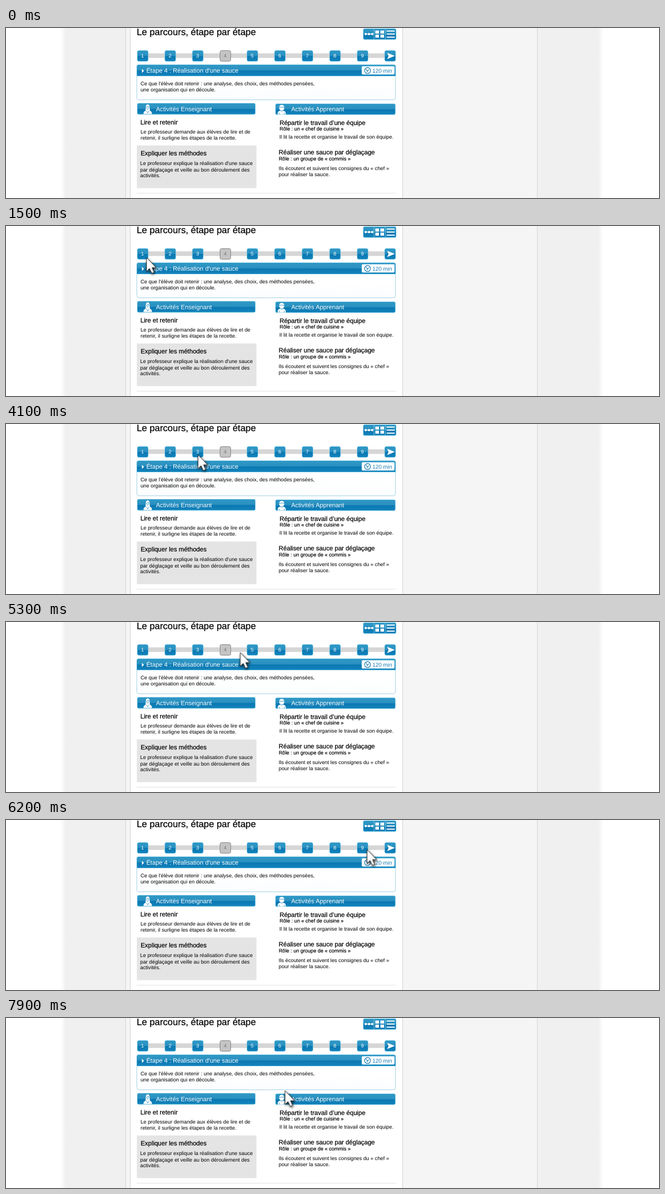
Animation, 1280 px wide and 335 px high, one loop 8000 ms. Source, as an HTML page:

```html
<!DOCTYPE html>
<html lang="fr">
<head>
<meta charset="utf-8">
<title>Le parcours, étape par étape</title>
<style>
  html, body { margin: 0; width: 100%; height: 100%; overflow: hidden; background: #fff; }
  svg { display: block; width: 1280px; height: 335px; }
  text { font-family: "Liberation Sans", Arial, sans-serif; text-rendering: geometricPrecision; fill: #000; }
  .title { font-size: 18.2px; stroke: #000; stroke-width: .25; }
  .head { font-size: 12.43px; stroke: #000; stroke-width: .25; }
  .role { font-size: 9.95px; stroke: #000; stroke-width: .2; }
  .body { font-size: 10.2px; }
  .bar { font-size: 12.15px; fill: #fff; }
  .num { font-size: 10px; fill: #fff; text-anchor: middle; }
  .time { font-size: 10.8px; fill: #1a7db3; }
  .blue { fill: url(#blue); stroke: #57b7dc; }
  .edge { fill: #cfcfcf; }

  /* 10 steps per second: each leg is cut into its number of 100 ms steps */
  #cursor {
    animation: travel 8s -10ms infinite, appear 8s -10ms infinite;
    filter: drop-shadow(1.5px 2px 2.5px rgba(0, 0, 0, .85));
  }
  @keyframes appear {
    0% { opacity: 0; animation-timing-function: steps(4); }
    5%, 100% { opacity: 1; }
  }
  @keyframes travel {
    0% { transform: translate(500px, 8px); }
    5% { transform: translate(500px, 8px); animation-timing-function: steps(11); }
    18.75% { transform: translate(275px, 62px); }
    30% { transform: translate(275px, 62px); animation-timing-function: steps(6); }
    37.5% { transform: translate(321px, 61px); }
    48.75% { transform: translate(321px, 61px); animation-timing-function: steps(4); }
    53.75% { transform: translate(431px, 60px); }
    65% { transform: translate(431px, 60px); animation-timing-function: steps(11); }
    78.75% { transform: translate(735px, 58px); }
    90% { transform: translate(735px, 58px); animation-timing-function: steps(7); }
    98.75%, 100% { transform: translate(546.5px, 143px); }
  }
</style>
</head>
<body>
<svg viewBox="0 0 1280 335">
  <defs>
    <linearGradient id="blue" x2="0" y2="1">
      <stop offset="0" stop-color="#3098c6"/>
      <stop offset=".48" stop-color="#2990c0"/>
      <stop offset=".54" stop-color="#0a78b2"/>
      <stop offset="1" stop-color="#1583bb"/>
    </linearGradient>
    <linearGradient id="side">
      <stop offset="0" stop-color="#fff"/>
      <stop offset=".6" stop-color="#f6f6f6"/>
      <stop offset="1" stop-color="#eee"/>
    </linearGradient>
    <linearGradient id="panel" x2="0" y2="1">
      <stop offset=".5" stop-color="#fff"/>
      <stop offset="1" stop-color="#fbfdfe"/>
    </linearGradient>
    <linearGradient id="arrow" x2="1" y2="1">
      <stop offset=".4" stop-color="#fff"/>
      <stop offset="1" stop-color="#dcdcdc"/>
    </linearGradient>
    <rect id="box" x="-10.5" y="44.5" width="21" height="21" rx="3"/>
  </defs>

  <!-- page -->
  <rect width="1280" height="335" fill="#fff"/>
  <rect x="117" width="1044" height="335" fill="#f0f0f0"/>
  <rect x="107" width="11" height="335" fill="url(#side)"/>
  <rect x="-1171" width="11" height="335" fill="url(#side)" transform="scale(-1 1)"/>
  <rect x="234" width="808" height="335" fill="#f5f5f5"/>
  <rect x="243" width="534" height="335" fill="#fff"/>
  <rect class="edge" x="234" width="1" height="335"/>
  <rect class="edge" x="243" width="1" height="335"/>
  <rect class="edge" x="777" width="1" height="335"/>
  <rect class="edge" x="1041" width="1" height="335"/>
  <rect x="256" y="325" width="508" height="1" fill="#dedede"/>

  <text class="title" x="256.2" y="14">Le parcours, étape par étape</text>

  <!-- view switch -->
  <rect class="blue" x="700.5" y="1.5" width="64" height="21" rx="2.5"/>
  <path d="M721.5 2v20M743.5 2v20" stroke="#7cc8e4"/>
  <g fill="#fff">
    <rect x="704" y="11.3" width="15" height="1.4"/>
    <circle cx="705" cy="12" r="2.2"/><circle cx="711.5" cy="12" r="2.2"/><circle cx="718" cy="12" r="2.2"/>
    <path d="M724 5h7v6h-7zM734 5h7v6h-7zM724 13h7v6h-7zM734 13h7v6h-7z"/>
    <path d="M746 5h16v2h-16zM746 11h16v2h-16zM746 17h16v2h-16z"/>
  </g>

  <!-- steps -->
  <rect x="267" y="50" width="486" height="9" fill="#d6d6d6"/>
  <g id="steps"></g>
  <path d="M747 48.8L762 55 747 61.2 750 55z" fill="#fff"/>

  <!-- current step -->
  <rect x="256.5" y="72.5" width="507" height="69" rx="4" fill="url(#panel)" stroke="#9fcde2"/>
  <path class="blue" d="M256.5 94.5v-18.500a3.500 3.500 0 0 1 3.500-3.500h500a3.500 3.500 0 0 1 3.500 3.500v18.500z"/>
  <path d="M266.5 80.5l4 4-4 4z" fill="#fff"/>
  <text class="bar" x="275" y="88">Étape 4 : Réalisation d'une sauce</text>
  <rect x="697.5" y="75.5" width="64" height="16" rx="2" fill="#fff" stroke="#a3d5ea"/>
  <circle cx="708.7" cy="83.8" r="5.8" fill="none" stroke="#1a7db3" stroke-width="1.4"/>
  <path d="M706 80.5l2 4.5 3.6-3M708 85v2" fill="none" stroke="#1a7db3" stroke-width="1.2"/>
  <text class="time" x="718.3" y="87.5">120 min</text>
  <text class="body" x="263.7" y="113">Ce que l'élève doit retenir : une analyse, des choix, des méthodes pensées,</text>
  <text class="body" x="263.7" y="125">une organisation qui en découle.</text>

  <!-- teacher -->
  <rect class="blue" x="257.5" y="148.5" width="231" height="21.500" rx="2.5"/>
  <path d="M269.500 169.500c0-4 1.500-5.800 4.500-6.600l-.6-1.400c.6-2 .5-4 .7-6 .2-3.500 1.600-5 3.700-5s3.500 1.500 3.700 5c.2 2 .1 4 .7 6l-.6 1.400c3 .8 4.500 2.600 4.500 6.600z" fill="#fff"/>
  <path d="M275.800 155.500c2 0 3-1 3.300-1.800 0 1 .3 1.400.8 1.800 0 2.800-.9 4.400-2.100 4.400s-2-1.600-2-4.400zM275.300 163.300l2.500 4 2.500-4" fill="none" stroke="#1d86bb" stroke-width=".9"/>
  <text class="bar" x="294" y="164">Activités Enseignant</text>
  <text class="head" x="263.400" y="190">Lire et retenir</text>
  <text class="body" x="263.800" y="208">Le professeur demande aux élèves de lire et de</text>
  <text class="body" x="263.800" y="220">retenir, il surligne les étapes de la recette.</text>
  <rect x="256.500" y="231.500" width="234.500" height="84" fill="#e4e4e4"/>
  <text class="head" x="264" y="251">Expliquer les méthodes</text>
  <text class="body" x="263" y="270">Le professeur explique la réalisation d'une sauce</text>
  <text class="body" x="263" y="283">par déglaçage et veille au bon déroulement des</text>
  <text class="body" x="263" y="294">activités.</text>

  <!-- learner -->
  <rect class="blue" x="528.500" y="149.500" width="234.500" height="21" rx="2.500"/>
  <path d="M535.500 157c0-3.500 2-5.500 5-5.500s5 2 5 5.500c0 3.300-2 6-5 6s-5-2.700-5-6zM532.500 170.500c0-5 1.500-7 5-7.500 2 1.300 4 1.300 6 0 3.500.5 5 2.500 5 7.500z" fill="#fff"/>
  <path d="M535.500 156.500q5-1.600 10 0M535.500 170v-3M545.500 170v-3" fill="none" stroke="#1d86bb" stroke-width=".9"/>
  <text class="bar" x="559" y="164">Activités Apprenant</text>
  <text class="head" x="536.200" y="191">Répartir le travail d’une équipe</text>
  <text class="role" x="536.300" y="202">Rôle : un « chef de cuisine »</text>
  <text class="body" x="535.800" y="218">Il lit la recette et organise le travail de son équipe.</text>
  <text class="head" x="534.500" y="249">Réaliser une sauce par déglaçage</text>
  <text class="role" x="534.700" y="261">Rôle : un groupe de « commis »</text>
  <text class="body" x="534.500" y="280">Ils écoutent et suivent les consignes du « chef »</text>
  <text class="body" x="534.500" y="292">pour réaliser la sauce.</text>

  <g id="cursor">
    <path d="M.5 .5V27L6.300 21.700 10.800 31.300 15.400 29.200 11.200 20H19.300z" fill="url(#arrow)" stroke="#333" stroke-linejoin="round"/>
  </g>
</svg>
<script>
  const current = 4;
  const steps = document.getElementById('steps');
  let html = '';
  for (let n = 1; n <= 10; n++) {
    const x = Math.round(257 + (n - 1) * 53.87) + 11;
    const look = n === current ? 'fill="#c4c4c4" stroke="#808080"' : 'class="blue"';
    html += `<use href="#box" x="${x}" ${look}/>`;
    if (n < 10) {
      const tint = n === current ? ' style="fill:#777"' : '';
      html += `<text class="num" x="${x - .5}" y="58"${tint}>${n}</text>`;
    }
  }
  steps.innerHTML = html;
</script>
</body>
</html>
```
